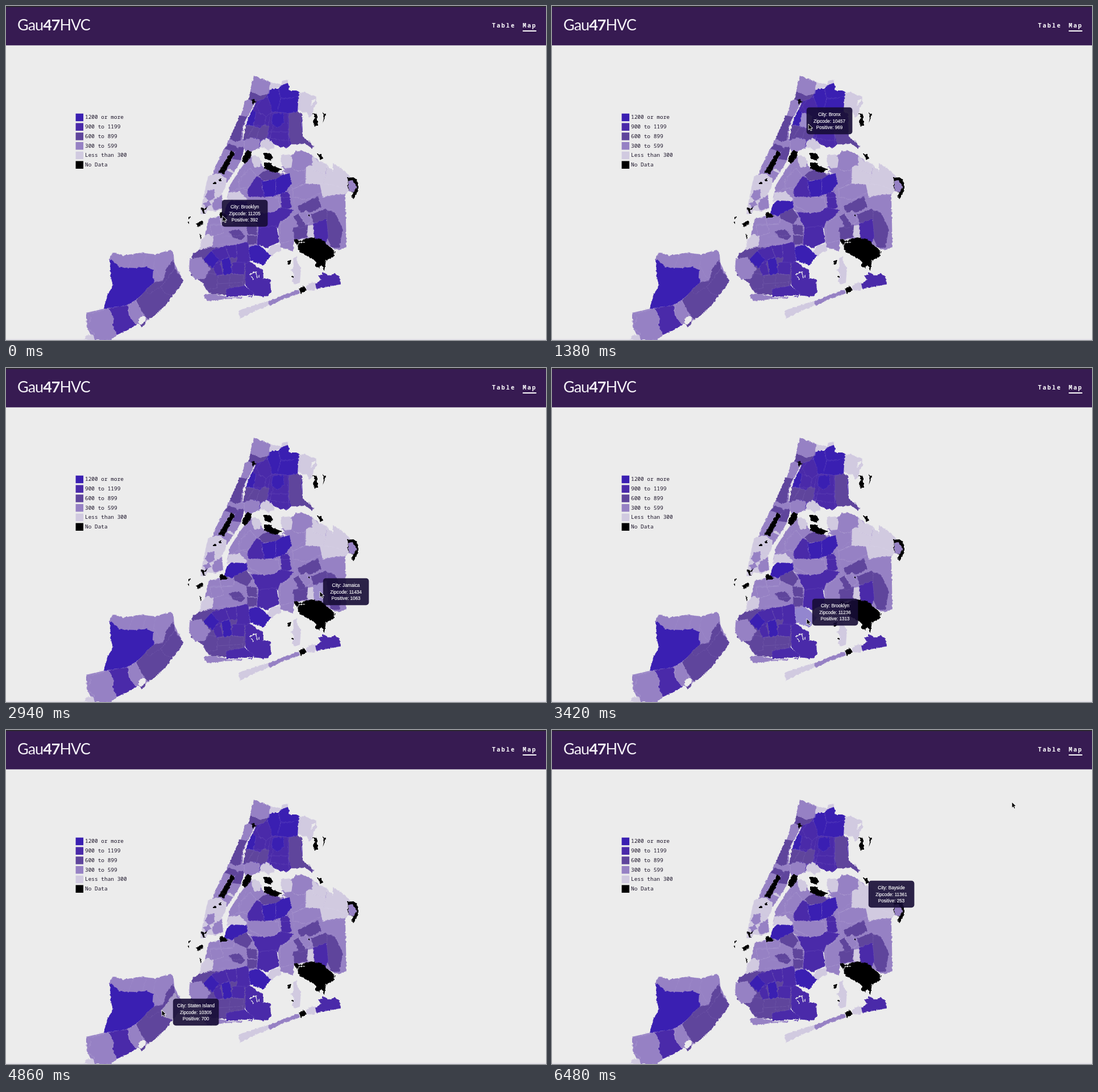
An HTML page that plays this animation: 950 px wide and 589 px high, repeating every 6540 ms.

```html
<!DOCTYPE html>
<html lang="en">
<head>
<meta charset="utf-8">
<title>Case map</title>
<style>
html, body { margin: 0; width: 100%; height: 100%; overflow: hidden; background: #ececec; }
svg { display: block; width: 950px; height: 589px; }
.a { --c: #3a1fb2; } .b { --c: #4a2aa9; } .c { --c: #5f459c; }
.d { --c: #9681c4; } .e { --c: #d1cae0; } .k { --c: #000; } .w { --c: #ececec; }
#map path { fill: var(--c); stroke: #b9aee0; stroke-opacity: .27; stroke-width: .5; stroke-linejoin: round; }
#map .e path, #map .d path { stroke: #e6e0f2; stroke-opacity: .32; }
#map .k path, #map .w path { stroke: none; }
#map path.on { fill: color-mix(in srgb, var(--c) 50%, #ececec); }
#map .line path { fill: none; }
#map .creek path { fill: none; stroke: #ececec; stroke-opacity: 1; stroke-width: 1.4; }
.key rect { fill: var(--c); }
.key text { font: 9.45px "Noto Sans Mono", "DejaVu Sans Mono", monospace; fill: #1a1328; }
.nav { font: 700 10.4px "Noto Sans Mono", "DejaVu Sans Mono", monospace; letter-spacing: 2.05px; fill: #fff; }
.brand { font: 400 27px Lato, Inter, sans-serif; letter-spacing: -1px; fill: #f4f1f7; }
.brand .n { font-weight: 700; }
#tip rect { fill: #170d36; fill-opacity: .9; }
#tip text { font: 8.13px "Liberation Sans", Arial, sans-serif; fill: #fff; stroke: #fff; stroke-width: .15; text-anchor: middle; }
</style>
</head>
<body>
<svg viewBox="0 0 950 589">
<filter id="rough" filterUnits="userSpaceOnUse" x="0" y="0" width="950" height="589" color-interpolation-filters="sRGB">
<feTurbulence type="fractalNoise" baseFrequency=".22" numOctaves="2" seed="4"/>
<feDisplacementMap in="SourceGraphic" scale="4" xChannelSelector="R" yChannelSelector="G"/>
</filter>
<rect width="950" height="69.4" fill="#371b52"/>
<rect width="950" height="2" fill="#2b2730"/>
<rect y="587" width="950" height="2" fill="#e3e1e8"/>
<text class="brand" x="20" y="43">Gau<tspan class="n">47</tspan>HVC</text>
<text class="nav" x="855" y="38">Table</text>
<text class="nav" x="909" y="38">Map</text>
<rect x="909" y="43" width="24" height="2" fill="#fff"/>
<g id="key"></g>

<g id="map" filter="url(#rough)">
<!-- Bronx -->
<g class="b">
<path d="M430 151L463 147 498 148 515 155 513 187 521 190 522 230 541 249 527 243 503 243 495 250 482 248 470 243 455 240 445 250 425 259 416 247 418 225 425 198 438 172Z"/>
<path id="z10458" data-i="Bronx,10458,1146" d="M448 166L460 160 465 171 468 187 458 194 446 189 441 176Z"/>
<path id="z10457" data-i="Bronx,10457,969" d="M440 188L446 189 458 194 455 209 446 215 435 212Z"/>
<path d="M466 189L479 187 496 189 498 248 482 249 464 236 459 222Z"/>
</g>
<g class="a">
<path id="z10453" data-i="Bronx,10453,1048" d="M433 182L440 188 435 212 421 209 425 198Z"/>
<path d="M463 147L470 146 480 146 483 163 478 187 468 187 464 170 459 158Z"/>
<path d="M480 146L482 140 495 134 498 141 497 149 512 149 519 154 514 160 500 163 483 163Z"/>
<path id="z10469" data-i="Bronx,10469,1452" d="M483 163L500 163 514 159 513 187 496 189 478 187Z"/>
<path id="z10462" data-i="Bronx,10462,1284" d="M469 190L488 189 489 205 478 215 467 207Z"/>
<path d="M461 222L497 222 497 238 480 236 463 233Z" class="b"/>
</g>
<g class="c">
<path d="M429 150L447 157 462 154 452 165 441 168 438 173 426 166Z"/>
<path id="z10465" data-i="Bronx,10465,829" d="M498 190L513 186 521 190 519 206 522 230 534 240 532 236 541 248 538 251 527 243 503 244 498 230Z"/>
<path d="M421 210L435 212 446 216 441 233 430 232 418 238 418 224Z"/>
<path d="M446 215L456 209 463 212 459 232 449 237 441 232Z"/>
</g>
<g class="d">
<path d="M436 123L465 134 463 154 447 158 429 150Z"/>
<path d="M418 238L430 232 447 235 445 250 426 259 416 248Z"/>
</g>
<g class="e">
<path d="M465 134L484 139 486 132 495 130 497 135 482 141 475 146 463 146Z"/>
<path d="M515 153L525 152 546 160 545 165 539 166 536 175 545 166 548 170 541 181 539 193 533 197 529 186 522 188 514 182Z"/>
<path d="M448 238L460 233 471 242 472 251 461 255 454 249 446 250Z"/>
</g>

<!-- Manhattan -->
<g class="d">
<path d="M421 167L430 166 438 172 431 184 424 196 417 214 417 240 419 251 412 276 399 296 388 312 372 300 362 300 370 280 385 250 403 214 413 193Z"/>
<path d="M393 234L405 239 418 237 420 249 412 259 404 257 395 255 375 292 374 299 362 300 370 280 385 250Z"/>
</g>
<g class="c">
<path d="M411 193L424 195 416 214 413 237 404 240 393 234 402 214Z"/>
<path d="M390 243L403 246 411 256 407 268 400 264 404 257 395 255 385 252Z"/>
<path d="M403 258L410 248 419 250 413 272 398 270Z"/>
</g>
<g class="e">
<path d="M356 299L374 296 388 304 386 320 380 331 382 357 367 363 355 360 350 367 342 367 346 343 352 315Z"/>
<path d="M391 287L402 292 400 295 389 290Z"/>
</g>
<g class="d">
<path d="M355 325L367 323 366 340 357 344 350 337Z"/>
<path d="M366 341L380 333 382 356 367 361 362 352Z"/>
<path d="M347 348L357 343 361 351 352 357Z"/>
</g>
<g class="k">
<path d="M396 255L403 259 383 297 374 293Z"/>
<path d="M432 166L437 164 440 170 434 173Z"/>
<path d="M374 305L379 304 379 309 375 309ZM365 311L369 310 369 314 365 314Z"/>
<path d="M343 355L349 357 354 353 352 359 348 360 350 366 347 366Z"/>
</g>

<!-- Queens -->
<g class="d">
<path d="M431 264L446 272 453 285 470 293 498 296 485 284 503 262 521 255 537 262 605 320 597 333 599 425 585 431 577 428 545 410 507 413 505 433 482 425 478 388 430 362 389 338 394 316 413 286Z"/>
<path id="z11357" data-i="Whitestone,11357,441" d="M503 263L510 256 521 255 538 262 540 278 528 284 526 290 510 291 502 284Z"/>
<path d="M485 292L502 284 510 291 526 290 527 313 505 323 500 315 498 297Z"/>
<path id="z11365" data-i="Fresh Meadows,11365,486" d="M505 323L527 313 552 313 556 328 528 342 505 337Z"/>
<path id="z11378" data-i="Maspeth,11378,572" d="M424 338L447 335 478 338 482 354 472 363 454 365 440 358 428 353Z"/>
<path d="M409 306L430 286 441 301 432 318 411 322Z"/>
<path d="M392 330L411 322 430 325 424 340 410 333Z"/>
<path d="M482 386L506 366 517 391 506 413 482 419Z"/>
<path d="M516 367L527 362 538 379 528 386Z"/>
</g>
<g class="e">
<path d="M431 263L444 265 450 275 445 284 437 285 433 275Z"/>
<path d="M391 329L411 327 424 341 413 352 397 342 389 346Z"/>
<path d="M483 263L500 262 504 271 502 285 490 286 484 278Z"/>
<path d="M538 262L548 273 565 279 562 296 540 290Z"/>
<path d="M565 280L575 291 575 277 592 288 607 302 600 309 606 326 597 332 572 333 558 315 563 296Z"/>
<path id="z11361" data-i="Bayside,11361,253" d="M528 284L540 280 540 290 563 296 558 315 527 313Z"/>
<path id="z11364" data-i="Oakland Gardens,11364,288" d="M552 313L572 315 597 323 590 330 557 337Z"/>
<path d="M529 388L540 386 542 411 529 406Z"/>
</g>
<g class="c">
<path id="z11369" data-i="East Elmhurst,11369,877" d="M452 292L461 289 478 293 484 299 478 306 452 308 444 299Z"/>
<path id="z11432" data-i="Jamaica,11432,859" d="M513 353L549 335 555 355 534 365 528 360 519 366Z"/>
<path d="M536 368L563 357 569 376 553 383 541 382Z"/>
<path id="z11420" data-i="South Ozone Park,11420,741" d="M504 391L531 386 530 408 507 413Z"/>
<path d="M565 360L579 364 593 394 586 427 573 426 564 407Z"/>
<path d="M506 371L514 366 529 389 516 392Z"/>
</g>
<g class="b">
<path d="M441 300L453 308 450 319 456 337 426 336 425 324 431 314Z"/>
<path d="M483 330L497 327 503 355 485 362Z"/>
<path d="M430 363L454 365 472 363 483 355 506 360 496 372 482 381 478 391 444 391Z"/>
<path id="z11208" data-i="Brooklyn,11208,1132" d="M442 391L476 388 481 416 458 427 441 420Z"/>
<path id="z11434" data-i="Jamaica,11434,1063" d="M540 384L564 375 567 407 561 419 543 409Z"/>
</g>
<g class="a">
<path id="z11372" data-i="Jackson Heights,11372,1315" d="M449 310L475 305 474 335 455 337Z"/>
<path d="M475 305L485 298 499 295 502 314 491 328 474 335Z"/>
</g>
<g class="e"><path d="M458 434L467 422 483 419 484 432 475 434 467 443Z"/></g>
<g class="k">
<path d="M506 411L520 414 537 408 555 412 579 433 579 440 563 449 560 467 555 457 550 462 543 459 546 453 539 446 516 433Z"/>
<path d="M421 259L426 254 433 258 430 268 421 277 414 273Z"/>
<path d="M453 259L463 259 470 266 466 273 455 269Z"/>
<path d="M454 276L467 276 468 281 485 288 474 294 454 287Z"/>
<path d="M548 261L555 261 558 269 553 271Z"/>
<path d="M600 303L613 302 620 313 620 325 612 340 608 337 611 329 602 325Z"/>
<path d="M540 189L547 191 549 211 543 213 540 203 543 198Z"/>
<path d="M557 187L560 190 563 190 561 197 557 207 559 198Z"/>
<path d="M532 368h2v3h-2z"/>
</g>
<g class="d"><path d="M601 309L610 307 617 319 612 328 604 327Z"/></g>
<g class="creek"><path d="M517 435C509 423 513 414 525 417M576 432L580 441"/><path d="M438 172C431 187 419 205 417 235"/></g>

<!-- Brooklyn -->
<g class="d">
<path d="M357 375L376 371 392 368 430 362 444 391 441 422 425 430 375 430 346 430 351 398Z"/>
<path id="z11205" data-i="Brooklyn,11205,392" d="M376 371L398 368 402 375 399 385 378 386Z"/>
<path d="M359 386L378 386 384 400 362 407Z"/>
<path d="M347 510L360 507 387 512 418 509 416 515 385 517 355 521Z"/>
</g>
<g class="c">
<path d="M328 438L345 426 425 425 428 450 425 480 412 511 362 508 352 500 345 487 325 475Z"/>
<path id="z11206" data-i="Brooklyn,11206,764" d="M400 366L423 357 434 372 424 385 402 375Z"/>
<path d="M392 397L410 393 421 406 414 413 398 408Z"/>
<path d="M423 385L441 387 442 404 425 402Z"/>
<path d="M424 404L442 405 441 420 425 421Z"/>
<path d="M357 471L373 474 371 497 355 500 345 487Z"/>
<path d="M393 472L418 475 417 493 393 494Z"/>
</g>
<g class="b">
<path d="M362 430L385 423 393 443 380 447 374 457 362 441Z"/>
<path d="M385 423L405 421 406 444 394 444Z"/>
<path d="M405 421L426 415 430 448 424 455 406 453Z"/>
<path d="M364 461L376 449 382 473 370 476Z"/>
<path d="M398 452L420 452 419 474 398 472Z"/>
<path id="z11234" data-i="Brooklyn,11234,1154" d="M421 455L430 450 440 459 452 465 453 480 465 482 466 505 457 513 437 510 421 492Z"/>
<path d="M387 499L420 493 436 506 432 514 414 510 388 514Z"/>
</g>
<g class="a">
<path d="M388 350L396 343 423 344 425 356 403 366 398 371 384 366Z" id="z11211" data-i="Brooklyn,11211,1240"/>
<path id="z11219" data-i="Brooklyn,11219,1378" d="M347 447L361 432 375 447 363 463Z"/>
<path id="z11230" data-i="Brooklyn,11230,1360" d="M379 448L394 443 398 471 383 474Z"/>
<path id="z11236" data-i="Brooklyn,11236,1313" d="M427 425L444 421 455 430 466 440 459 449 453 458 445 454 430 449Z"/>
</g>
<g class="d"><path id="z11209" data-i="Brooklyn,11209,568" d="M323 446L343 443 360 463 349 481 333 482 322 467Z"/></g>
<g class="e">
<path d="M344 412L354 402 366 407 362 424 348 428 340 430Z"/>
<path d="M505 444L512 442 513 453 519 463 517 488 508 491 503 486 507 472 500 466 506 462Z"/>
<path d="M410 537L435 528 462 520 465 527 440 537 411 552Z"/>
<path d="M528 494L537 487 546 489 543 502 530 501Z"/>
</g>
<g class="d"><path d="M461 521L500 505 515 500 517 507 490 516 464 529Z"/></g>
<g class="b"><path d="M549 475L557 475 557 469 570 476 577 472 587 477 588 491 566 495 546 499 544 490 554 483Z"/></g>
<g class="k">
<path d="M515 499L524 494 530 500 519 507Z"/>
<path d="M375 366L381 364 390 369 388 373 377 373Z"/>
<path d="M335 384L342 379 347 380 346 385 338 390Z"/>
<path d="M318 380L322 381 321 385ZM321 372L325 371 324 375 321 375ZM341 403L343 404 344 411 342 410Z"/>
<path d="M495 450L502 447 500 455 496 457ZM502 477L505 475 506 479 502 479Z"/>
</g>
<g class="creek"><path d="M430 450C440 455 448 459 453 464M429 475C433 470 436 467 442 470M431 477L436 483M442 479L439 468M445 474L445 480"/><path d="M388 514L432 511"/></g>

<!-- Staten Island -->
<g class="d">
<path d="M182 446L188 434 205 440 238 435 262 438 290 430 295 438 296 453 312 484 293 511 270 538 246 556 229 562 215 571 195 580 184 589 155 589 142 567 141 541 172 534 188 494Z"/>
<path d="M141 541L154 541 180 533 190 551 187 562 195 580 184 589 153 589 155 577 142 567 150 550Z"/>
</g>
<g class="a"><path id="z10314" data-i="Staten Island,10314,1622" d="M183 447L190 451 200 461 230 462 248 460 259 466 258 478 262 486 250 500 230 517 214 527 172 534 179 508 188 494 184 475Z"/></g>
<g class="c">
<path d="M283 461L294 447 297 462 312 484 304 497 293 511 284 524 270 538 250 554 235 533 229 519 260 487 276 485Z"/>
<path id="z10304" data-i="Staten Island,10304,668" d="M260 487L276 485 283 461 296 450 297 463 273 494 252 508 246 502Z"/>
<path id="z10305" data-i="Staten Island,10305,700" d="M297 463L305 475 312 484 304 497 293 511 279 506 272 496Z"/>
<path d="M236 561L244 555 246 558 239 567Z"/>
</g>
<g class="b"><path id="z10306" data-i="Staten Island,10306,1010" d="M180 533L214 527 216 545 229 562 215 571 195 580 187 562 190 551Z"/></g>
<g class="d"><path id="z10308" data-i="Staten Island,10308,430" d="M217 526L228 519 236 532 242 550 234 561 226 559 216 545Z"/></g>
<g class="e"><path d="M138 589L141 581 153 579 156 589Z"/></g>
<g class="w"><path d="M233 551L241 546 247 550 244 557 238 562 233 558Z"/></g>

<g class="line"><path d="M216 461L224 437M240 461L247 437M258 466L264 438M276 485L260 459"/><path d="M478 338L505 337 510 365M530 340L597 333M555 355L580 362M482 381L515 366"/><path d="M371 475L393 474M373 490L418 487M360 384L400 385M380 407L424 404M375 420L424 417"/><path d="M420 211L458 211M428 184L440 168M471 208L463 236M425 232L436 213"/><path d="M366 284L386 290M356 310L384 313M352 325L381 327M422 285L408 321M500 325L525 305"/></g>
</g>

<g id="tip"><rect x="-.2" y="-.3" width="80.6" height="47.6" rx="5"/><text x="40" y="15"/><text x="40" y="26.5"/><text x="40" y="38"/></g>
<path id="cursor" d="M0 0V10.6L2.5 8.3 4.2 12 6.1 11.2 4.5 7.6H7.8Z" fill="#000" stroke="#fff" stroke-width=".9" stroke-linejoin="round"/>
</svg>

<script>
const LOOP = 6540, STEP = 60;
const $ = id => document.getElementById(id);

const labels = ['1200 or more', '900 to 1199', '600 to 899', '300 to 599', 'Less than 300', 'No Data'];
$('key').innerHTML = labels.map((label, i) => {
  const y = 189.7 + i * 16.75;
  return `<g class="key ${'abcdek'[i]}"><rect x="122.6" y="${y}" width="13.5" height="13.5"/>` +
    `<text x="139" y="${y + 9.6}">${label}</text></g>`;
}).join('');

// time, pointer x, y, zone entered ('' means the pointer leaves the map)
const track = [
  [-60, 374, 365, 'z11205'], [0, 381, 370], [180, 398, 372, 'z11206'],
  [360, 412, 352, 'z11211'], [540, 440, 350, 'z11378'], [720, 462, 324, 'z11372'],
  [840, 463, 300, 'z11369'], [960, 460, 260, ''], [1200, 433, 195, 'z10453'],
  [1320, 442, 202, 'z10457'], [1380, 451, 208], [1560, 478, 200, 'z10462'],
  [1740, 500, 172, 'z10469'], [1920, 508, 208, 'z10465'], [2160, 514, 245, ''],
  [2280, 516, 252, 'z11357'], [2400, 527, 283], [2520, 538, 293, 'z11361'],
  [2700, 562, 323, 'z11364'], [2820, 545, 347, 'z11432'], [2940, 552, 394, 'z11434'],
  [3060, 516, 400, 'z11420'], [3180, 466, 403, 'z11208'], [3300, 452, 430, 'z11236'],
  [3420, 448, 442], [3600, 428, 462, 'z11234'], [3780, 391, 460, 'z11230'],
  [3960, 361, 448, 'z11219'], [4140, 340, 462, 'z11209'], [4380, 317, 478, ''],
  [4680, 288, 497, 'z10305'], [4860, 274, 494], [5040, 266, 490, 'z10304'],
  [5220, 225, 490, 'z10314'], [5460, 198, 548, 'z10306'], [5700, 215, 538, 'z10308'],
  [5820, 240, 549], [6060, 262, 535, ''], [6120, 338, 468, 'z11209'],
  [6180, 391, 455, 'z11230'], [6240, 452, 402, 'z11208'], [6300, 518, 330, 'z11365'],
  [6360, 551, 289, 'z11361'], [6420, 690, 200, ''], [6480, 809, 127]
];

const lines = $('tip').querySelectorAll('text');
const zones = document.querySelectorAll('#map [id]');
const move = (id, x, y) => $(id).setAttribute('transform', `translate(${x} ${y})`);

function draw(time) {
  const t = Math.floor(time % LOOP / STEP) * STEP;
  const past = track.filter(k => k[0] <= t);
  const from = past[past.length - 1];
  const to = track[past.length] || from;
  const p = (t - from[0]) / (to[0] - from[0] || 1);
  move('cursor', from[1] + (to[1] - from[1]) * p, from[2] + (to[2] - from[2]) * p);

  // The tooltip stays where the pointer entered the last zone.
  const moves = past.filter(k => k.length > 3);
  const zone = moves[moves.length - 1][3];
  const [, x, y, shown] = moves.filter(k => k[3]).pop();
  const [city, zip, count] = $(shown).dataset.i.split(',');
  [`City: ${city}`, `Zipcode: ${zip}`, `Positive: ${count}`]
    .forEach((s, i) => { lines[i].textContent = s; });
  move('tip', x + 6, y - 23);
  zones.forEach(z => z.classList.toggle('on', z.id === zone));
}

const start = performance.now();
let last = -1;
function tick() {
  const time = performance.now() - start;
  const step = Math.floor(time / STEP);
  if (step !== last) draw(time);
  last = step;
  requestAnimationFrame(tick);
}
tick();
</script>
</body>
</html>
```
